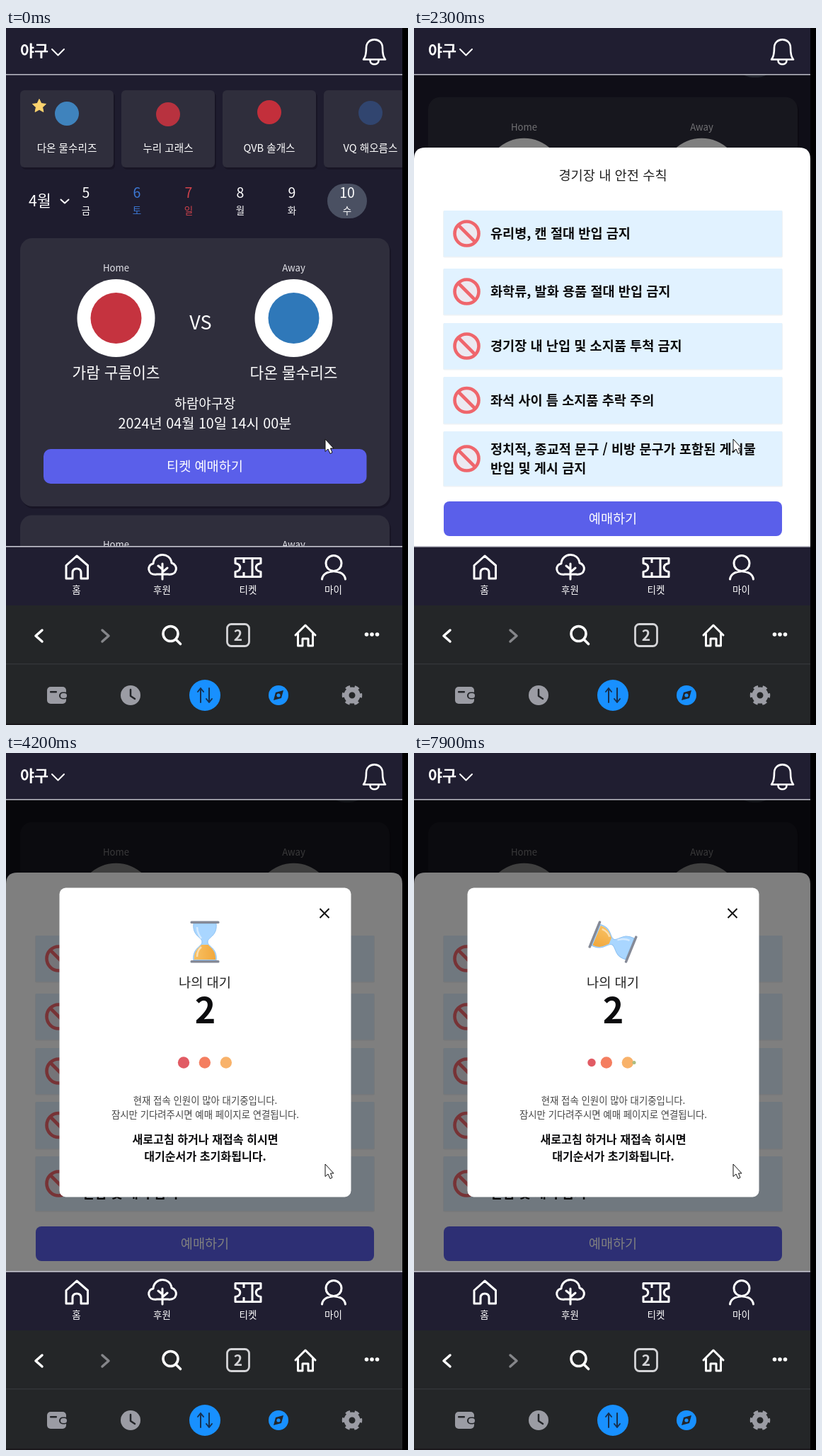
Write an HTML page that moves like this. It is 568 px wide and 985 px high and loops after 8000 ms.

```html
<!DOCTYPE html>
<html lang="ko">
<head>
<meta charset="utf-8">
<title>경기 예매</title>
<style>
html, body { margin: 0; width: 100%; height: 100%; overflow: hidden; background: #000; }
svg { display: block; width: 100vw; height: 100vh; font-family: "Noto Sans CJK KR", "Noto Sans CJK", "Noto Sans CJK JP", sans-serif; }
.line { fill: none; stroke: #fff; stroke-width: 3; stroke-linecap: round; stroke-linejoin: round; }
</style>
</head>
<body>
<svg id="stage" viewBox="0 0 568 985" preserveAspectRatio="none"></svg>
<script>
const LOOP = 8000;
const stage = document.getElementById('stage');

// Text is placed by its vertical middle.
const text = (x, y, size, str, { fill = '#fff', anchor = 'middle', weight = 400 } = {}) =>
  `<text x="${x}" y="${y + size * 0.365}" font-size="${size}" fill="${fill}" text-anchor="${anchor}" font-weight="${weight}">${str}</text>`;
const rect = (x, y, w, h, r, fill, extra = '') =>
  `<rect x="${x}" y="${y}" width="${w}" height="${h}" rx="${r}" fill="${fill}" ${extra}/>`;
const circle = (x, y, r, fill, extra = '') =>
  `<circle cx="${x}" cy="${y}" r="${r}" fill="${fill}" ${extra}/>`;
const line = (d, extra = '') => `<path class="line" d="${d}" ${extra}/>`;
const group = (id, body, extra = '') => `<g id="${id}" ${extra}>${body}</g>`;

const raised = (x, y, w, h, r) =>
  rect(x + 2, y + 3, w, h, r, '#141220', 'opacity=".6"') + rect(x, y, w, h, r, '#2f2e3c');

function teamTabs() {
  const teams = [
    ['다온 물수리즈', '#3f83bd', 121], ['누리 고래스', '#b8323f', 122],
    ['QVB 솔개스', '#c32f3b', 119], ['VQ 해오름스', '#31456f', 120]
  ];
  const star = Array.from({ length: 10 }, (_, i) => {
    const a = i * Math.PI / 5 - Math.PI / 2, r = i % 2 ? 4.8 : 10;
    return `${47 + r * Math.cos(a)},${110.5 + r * Math.sin(a)}`;
  }).join(' ');
  return teams.map(([name, color, y], i) =>
    raised(20 + 143 * i, 88, 132, 109, 6) + circle(86 + 143 * i, y, 17, color) +
    text(86 + 143 * i, 170, 14.6, name)
  ).join('') + `<polygon points="${star}" fill="#fbd36e" stroke="#fbd36e" stroke-linejoin="round"/>`;
}

function dateRow() {
  const days = [[113, 5, '금'], [185, 6, '토', '#3d79d6'], [258, 7, '일', '#cf424b'],
    [331, 8, '월'], [404, 9, '화'], [482, 10, '수']];
  return rect(454, 220, 56, 49, 24.5, '#4a5062') +
    text(32, 244, 21.5, '4월', { anchor: 'start' }) +
    line('M77.5 242.5l5.5 5 5.5-5', 'style="stroke-width:2"') +
    days.map(([x, n, day, fill]) => text(x, 233, 19.5, n, { fill }) + text(x, 258.5, 13.5, day, { fill })).join('');
}

function matchCard(y, home, away, place) {
  const side = (x, label, [name, color]) =>
    text(x, y + 42, 13.2, label, { fill: '#e4e4ea' }) + circle(x, y + 113, 55, '#fff') +
    circle(x, y + 113, 36, color) + text(x, y + 190, 21.4, name);
  return raised(20, y, 522, 379, 17) +
    side(155.5, 'Home', home) + side(406.5, 'Away', away) +
    text(275, y + 119, 27, 'VS') +
    text(281, y + 234, 18.8, place) +
    text(281, y + 261.5, 19.8, '2024년 04월 10일 14시 00분') +
    rect(53, y + 298, 456.5, 49, 10, '#5a5fea') +
    text(281, y + 322, 18.6, '티켓 예매하기');
}

function safetySheet() {
  const rules = [
    [258, 65, ['유리병, 캔 절대 반입 금지']],
    [340, 65, ['화학류, 발화 용품 절대 반입 금지']],
    [417, 65, ['경기장 내 난입 및 소지품 투척 금지']],
    [493, 66, ['좌석 사이 틈 소지품 추락 주의']],
    [570, 77, ['정치적, 종교적 문구 / 비방 문구가 포함된 게시물', '반입 및 게시 금지']]
  ];
  const row = ([y, h, lines]) => {
    const mid = y + h / 2;
    return rect(41, y, 480, h + 1.5, 2, '#eef2f5') + rect(42, y, 478, h, 1, '#e1f2ff') +
      `<g stroke="#ef666c" stroke-width="4.6" fill="none">${circle(74.5, mid, 17, '#ece9f1')}
       <path d="M62.5 ${mid - 12}l24 24"/></g>` +
      lines.map((s, i) => text(108, mid + (i - (lines.length - 1) / 2) * 27, 18.6, s,
        { fill: '#0b0b0d', anchor: 'start', weight: 600 })).join('');
  };
  return '<path d="M0 760V185Q0 169 16 169H544Q560 169 560 185V760Z" fill="#fff"/>' +
    text(281, 208, 18.7, '경기장 내 안전 수칙', { fill: '#222' }) +
    rules.map(row).join('') +
    rect(42, 669, 478, 49, 8, '#5a5fea') + text(281, 693.5, 18.6, '예매하기');
}

function hourglass() {
  return `<g id="glass" transform="translate(281 267)">
    <path d="M-16-26H16C18-8 4-7 4 0S18 8 16 26H-16C-18 8-4 7-4 0S-18-8-16-26Z" fill="#a9d6ff" stroke="#8fc2f2"/>
    <g clip-path="url(#bulbs)" fill="url(#sand)">
      <rect id="upper" x="-20" width="40"/><rect id="lower" x="-20" width="40"/>
      <rect id="stream" x="-1" y="-2" width="2" height="28"/>
    </g>
    <path d="M-11-21C-11-12-7-8-5-5M-11 21C-11 13-8 10-5 7" fill="none" stroke="#fff" stroke-width="2.5" opacity=".5"/>
    ${rect(-20.5, -29.5, 41, 3.5, 1.5, '#858a97')}${rect(-20.5, 26, 41, 3.5, 1.5, '#858a97')}</g>`;
}

function waitingPopup() {
  const dark = { fill: '#0b0b0d', weight: 700 }, soft = { fill: '#444' };
  return rect(75.5, 190.5, 412, 437, 9, '#fff') +
    line('M443.5 220l13 13m0-13l-13 13', 'style="stroke:#111;stroke-width:2;stroke-linecap:butt"') +
    hourglass() + text(281, 324, 18.7, '나의 대기', { fill: '#222' }) +
    text(281.5, 363.5, 50, '2', dark) + group('dots', circle(0, 437.5, 0, '').repeat(4)) +
    text(281.5, 491, 13.4, '현재 접속 인원이 많아 대기중입니다.', soft) +
    text(281.5, 511.5, 13.4, '잠시만 기다려주시면 예매 페이지로 연결됩니다.', soft) +
    text(281.5, 546, 16.1, '새로고침 하거나 재접속 히시면', dark) +
    text(281.5, 570, 16.1, '대기순서가 초기화됩니다.', dark);
}

const header = () => rect(0, 0, 560, 66, 0, '#201e31') + rect(0, 65, 560, 1.6, 0, '#b4b4bf') +
  text(20, 32, 21.8, '야구', { anchor: 'start', weight: 600 }) +
  line('M65 30l8.5 8.5 8.5-8.5', 'style="stroke-width:2"') +
  line('M505 44.5Q509 40 509 28C509 12.5 532 12.5 532 28Q532 40 536 44.5Z M514.5 46C514.5 53 526.5 53 526.5 46', 'style="stroke-width:2.6"');

const appNav = () => rect(0, 733, 560, 83, 0, '#201e31') + rect(0, 732, 560, 1.6, 0, '#c6c6d0') +
  line('M85 759.5L100 746 115.5 759.5V778H106V770Q106 764 100 764T94 770V778H85Z') +
  line('M213 772C199 774 199 758 208 757C209 741 232 740 234 756C244 759 242 774 229 772Z M221 779V757M221 765l-6-5M221 769l7-6') +
  line('M324 749.5H360V756.5C351 758 351 767 360 768.5V775.5H324V768.5C333 767 333 758 324 756.5Z M336 749.5V756M336 769V775.5M348 749.5V775.5', 'style="stroke-linecap:butt"') +
  line('M446.5 779C448 764 478 764 479.5 779M474 756.5a11 11 0 1 1-22 0a11 11 0 1 1 22 0') +
  [['홈', 99.5], ['후원', 220.5], ['티켓', 342], ['마이', 462.5]].map(([s, x]) => text(x, 794, 13.5, s)).join('');

function browserBars() {
  const gray = '#9b9ca4', blue = '#1890ff', ink = '#232529';
  return rect(0, 816, 560, 169, 0, '#242628') + rect(0, 898, 560, 1.5, 0, '#333538') +
    rect(0, 983, 560, 2, 0, '#1a171b') +
    line('M51 851l-9 8 9 8', 'style="stroke-width:3.5"') +
    line('M136 851l9 8-9 8', 'style="stroke-width:3.5;stroke:#85868a"') +
    line('M243 856a10.5 10.5 0 1 1-21 0a10.5 10.5 0 1 1 21 0M240.5 864.5l6 6', 'style="stroke-width:3.6"') +
    rect(312.5, 842.5, 31, 31, 6, 'none', 'stroke="#d4d4d7" stroke-width="2.8"') +
    text(328, 858.5, 21, '2', { weight: 700, fill: '#d4d4d7' }) +
    line('M409 858L423 844 437 858M412.5 856V873H419V863H427V873H433.5V856') +
    [509.5, 517, 524.5].map(x => circle(x, 857, 2.8, '#fff')).join('') +
    rect(58, 931, 27, 24, 5, gray) + rect(62, 937, 10, 2.4, 1, ink) +
    rect(75, 938.5, 13, 10, 5, ink) + rect(77, 940, 9, 7, 3.5, gray) +
    circle(176, 943, 14, gray) + line('M176 935V944l6 4', `style="stroke:${ink};stroke-width:2.5"`) +
    circle(281, 943, 22, blue) +
    line('M275 953V933m-4 5l4-5 4 5M287 933V953m-4-5l4 5 4-5', 'style="stroke:#17304f;stroke-width:2"') +
    circle(385, 943, 14, blue) +
    `<path d="M392 936L389 947 378 950 381 939Z" fill="${ink}"/>` + circle(385, 943, 2.6, blue) +
    circle(489, 943, 8, 'none', `stroke="${gray}" stroke-width="7"`) +
    circle(489, 943, 12, 'none', `stroke="${gray}" stroke-width="4.5" stroke-dasharray="6.283" stroke-dashoffset="3.14"`);
}

const shade = id => group(id, rect(0, 66, 560, 667, 0, '#000'));

stage.innerHTML = `<defs>
  <clipPath id="view"><rect y="66" width="560" height="667"/></clipPath>
  <clipPath id="bulbs"><path d="M-15-25H15C16-8 3-7 3 0S16 8 15 25H-15C-16 8-3 7-3 0S-16-8-15-25Z"/></clipPath>
  <linearGradient id="sand"><stop stop-color="#f9c468"/><stop offset="1" stop-color="#f0a437"/></linearGradient>
</defs>` +
  rect(0, 0, 568, 985, 0, '#000') +
  group('body', rect(0, 66, 560, 667, 0, '#1e1c2e') +
    group('page', teamTabs() + dateRow() +
      matchCard(297, ['가람 구름이츠', '#c5333f'], ['다온 물수리즈', '#2f78b9'], '하람야구장') +
      matchCard(688.5, ['QOV 노을새즈', '#cb2b3d'], ['VU 물결스', '#b3263f'], '은솔-다솜 해돋이별 필드')) +
    shade('pageShade') + group('sheet', safetySheet()) +
    shade('sheetShade') + group('popup', waitingPopup()), 'clip-path="url(#view)"') +
  header() + appNav() + browserBars() +
  '<path d="M451 581V598.5L455 595 458 601.5 461 600 458.5 594H463Z" fill="#fff" stroke="#111" stroke-width="1"/>';

const el = id => document.getElementById(id);
const set = (node, attrs) => Object.entries(attrs).forEach(([k, v]) => node.setAttribute(k, v));
const ramp = (t, from, to) => Math.min(1, Math.max(0, (t - from) / (to - from)));
const smooth = p => p * p * (3 - 2 * p);
const dots = [...el('dots').children];
const dotColors = ['#e15b64', '#f47e60', '#f8b26a', '#abbd81'];

// Cubic Bezier easing (0, .5, .5, 1).
function settle(p) {
  let lo = 0, hi = 1;
  for (let i = 0; i < 20; i++) {
    const s = (lo + hi) / 2;
    if (1.5 * s * s - 0.5 * s ** 3 < p) lo = s; else hi = s;
  }
  return 1.5 * lo * (1 - lo) ** 2 + 3 * lo * lo * (1 - lo) + lo ** 3;
}

// Dots grow on the left, hop right twice, then shrink away.
function drawDots(t) {
  const steps = (t - 3740) / 500, n = Math.floor(steps), e = settle(steps - n);
  dots.forEach((dot, i) => set(dot, {
    cx: 251 + 30 * Math.min(2, Math.max(0, i - 1 + e)),
    r: 8.2 * (i === 0 ? e : i === 3 ? 1 - e : 1),
    fill: dotColors[(((i - n) % 4) + 4) % 4]
  }));
}

// Each cycle flips the glass, then lets the sand run down.
function drawGlass(t) {
  const start = 4400, c = (t - start) % 3150;
  const turn = t < start ? 0 : ramp(c, 0, 600);
  const run = t < start || turn < 1 ? 1 : ramp(c, 600, 2700);
  const angle = turn < 1 ? 180 * smooth(turn) : 0;
  set(el('glass'), { transform: `translate(281 267) rotate(${angle})` });
  set(el('upper'), { y: -21 + 21 * run, height: 21 * (1 - run) });
  set(el('lower'), { y: 25 - 21 * run, height: 21 * run });
  set(el('stream'), { visibility: run < 1 ? 'visible' : 'hidden' });
}

function draw(t) {
  const sheet = smooth(ramp(t, 1850, 2250));
  const popup = smooth(ramp(t, 3250, 3750));
  set(el('page'), { transform: `translate(0 ${-199.3 * smooth(ramp(t, 500, 1300))})` });
  set(el('pageShade'), { opacity: 0.5 * sheet });
  set(el('sheet'), { transform: `translate(0 ${564 * (1 - sheet)})` });
  set(el('sheetShade'), { opacity: 0.5 * ramp(t, 3200, 3300) });
  set(el('popup'), { opacity: popup, transform: `translate(0 ${105 * (1 - popup)})` });
  drawDots(t);
  drawGlass(t);
}

const begin = performance.now();
function tick() {
  const t = (performance.now() - begin) % LOOP;
  draw(Math.floor(t / 100) * 100);
  requestAnimationFrame(tick);
}
draw(0);
requestAnimationFrame(tick);
</script>
</body>
</html>
```
